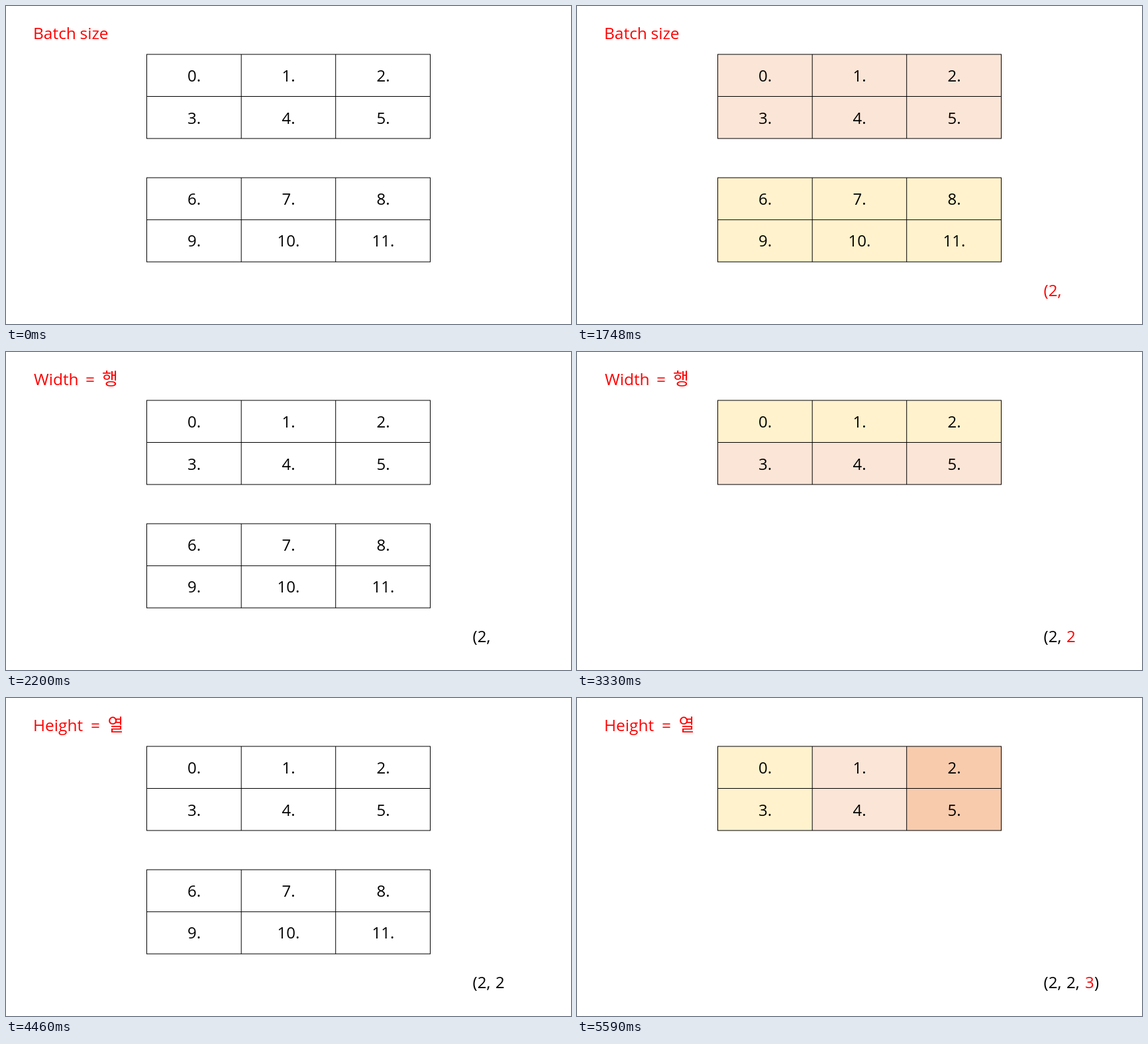
Animation of 853 by 480 pixels, one loop 6720 ms. Source, as an HTML page:

```html
<!DOCTYPE html>
<html lang="ko">
<head>
<meta charset="utf-8">
<title>Tensor shape</title>
<style>
  html, body { margin: 0; width: 100%; height: 100%; overflow: hidden; background: #fff; }
  svg { display: block; width: 853px; height: 480px; }
  text { font: 24px "Open Sans", "Noto Sans", sans-serif; }
  .title text { font-size: 24.5px; fill: #f00; }
  .title .hangul { font: 26px "Noto Sans CJK KR", "Noto Sans CJK", sans-serif; }
  .values { text-anchor: middle; }
  .peach { fill: #fbe5d6; }
  .cream { fill: #fff2cc; }
  .orange { fill: #f8cbad; }

  /* Hard cuts at 1070, 2200, 3330, 4460 and 5590 ms of 6720 ms */
  .timed { animation: 6720ms step-end infinite; }
  .batch-title { animation-name: batch-title; }
  .width-title { animation-name: width-title; }
  .height-title { animation-name: height-title; }
  .batch-tint { animation-name: batch-tint; }
  .row-tint { animation-name: row-tint; }
  .column-tint { animation-name: column-tint; }
  .second-table { animation-name: second-table; }
  .batch-count { animation-name: batch-count; }
  .row-count { animation-name: row-count; }

  @keyframes batch-title {
    0% { visibility: visible; }
    32.738%, 100% { visibility: hidden; }
  }
  @keyframes width-title {
    0%, 66.369%, 100% { visibility: hidden; }
    32.738% { visibility: visible; }
  }
  @keyframes height-title {
    0% { visibility: hidden; }
    66.369%, 100% { visibility: visible; }
  }
  @keyframes batch-tint {
    0%, 32.738%, 100% { visibility: hidden; }
    15.923% { visibility: visible; }
  }
  @keyframes row-tint {
    0%, 66.369%, 100% { visibility: hidden; }
    49.554% { visibility: visible; }
  }
  @keyframes column-tint {
    0% { visibility: hidden; }
    83.185%, 100% { visibility: visible; }
  }
  @keyframes second-table {
    0%, 66.369% { visibility: visible; }
    49.554%, 83.185%, 100% { visibility: hidden; }
  }
  @keyframes batch-count {
    0% { fill: transparent; }
    15.923% { fill: #f00; }
    32.738%, 100% { fill: #000; }
  }
  @keyframes row-count {
    0% { fill: transparent; }
    49.554% { fill: #f00; }
    66.369%, 100% { fill: #000; }
  }
</style>
</head>
<body>
<svg viewBox="0 0 853 480">
  <defs>
    <path id="grid" d="M212 0H641M212 63.5H641M212 127H641M212.5 0V127M355.2 0V127M497.7 0V127M640.5 0V127"
      fill="none" stroke="#000"/>
  </defs>

  <g class="title">
    <text class="timed batch-title" y="50"><tspan x="41">Batch</tspan><tspan x="111.5">size</tspan></text>
    <g class="timed width-title">
      <text y="50"><tspan x="42">Width</tspan><tspan x="120">=</tspan></text>
      <text class="hangul" x="145" y="50.4">행</text>
    </g>
    <g class="timed height-title">
      <text y="50"><tspan x="41">Height</tspan><tspan x="128">=</tspan></text>
      <text class="hangul" x="153.5" y="50.4">열</text>
    </g>
  </g>

  <g class="timed batch-tint">
    <rect class="peach" x="212.5" y="73" width="428" height="127"/>
    <rect class="cream" x="212.5" y="259" width="428" height="127"/>
  </g>
  <g class="timed row-tint">
    <rect class="cream" x="212.5" y="73" width="428" height="63.5"/>
    <rect class="peach" x="212.5" y="136.5" width="428" height="63.5"/>
  </g>
  <g class="timed column-tint">
    <rect class="cream" x="212.5" y="73" width="142.7" height="127"/>
    <rect class="peach" x="355.2" y="73" width="142.5" height="127"/>
    <rect class="orange" x="497.7" y="73" width="142.8" height="127"/>
  </g>

  <g class="values">
    <use href="#grid" y="73"/>
    <text y="114"><tspan x="284">0.</tspan><tspan x="426.5">1.</tspan><tspan x="569.5">2.</tspan></text>
    <text y="178"><tspan x="284">3.</tspan><tspan x="426.5">4.</tspan><tspan x="569.5">5.</tspan></text>
    <g class="timed second-table">
      <use href="#grid" y="259.2"/>
      <text y="300"><tspan x="284">6.</tspan><tspan x="426.5">7.</tspan><tspan x="569.5">8.</tspan></text>
      <text y="363"><tspan x="284">9.</tspan><tspan x="426.5">10.</tspan><tspan x="569.5">11.</tspan></text>
    </g>
  </g>

  <text class="timed batch-count" x="704.6" y="438">(2,</text>
  <text class="timed row-count" x="739" y="438">2</text>
  <text class="timed column-tint" y="438"><tspan x="752.7">,</tspan><tspan x="767" fill="#f00">3</tspan><tspan x="781">)</tspan></text>
</svg>
</body>
</html>
```
